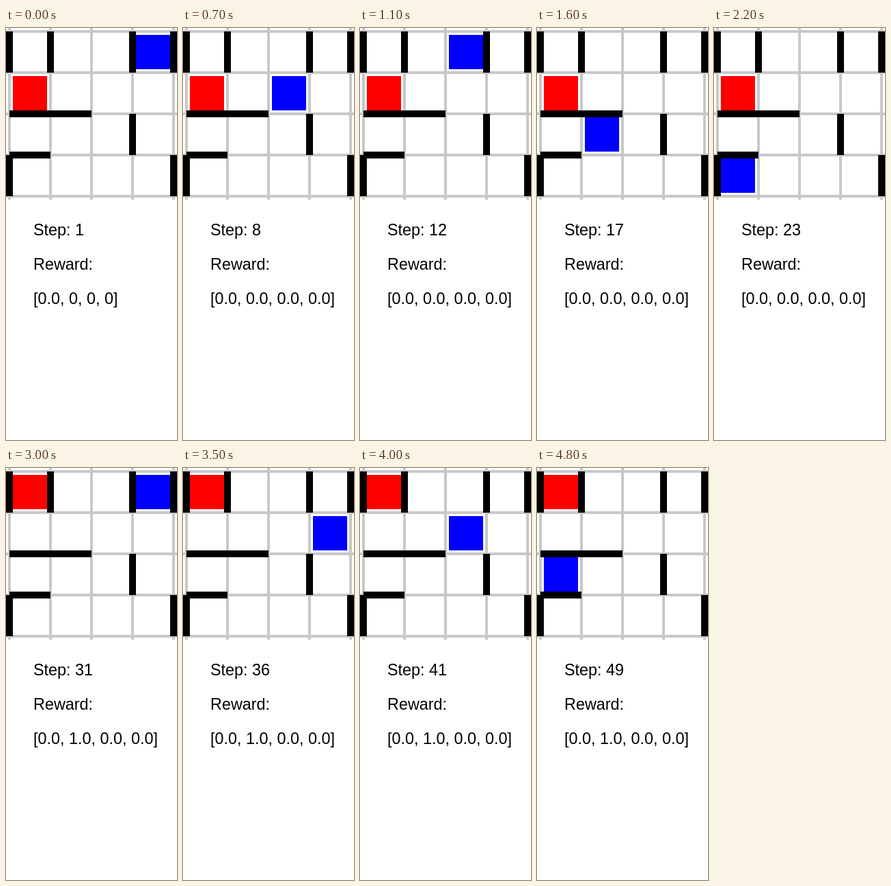
These frames come from a looping animation (250 px wide and 600 px high, 4900 ms). An HTML page with a canvas:

```html
<!DOCTYPE html>
<html lang="en">
<head>
<meta charset="utf-8">
<title>Grid world</title>
<style>
html, body { margin: 0; width: 250px; height: 600px; overflow: hidden; background: #fff; }
canvas { display: block; }
</style>
</head>
<body>
<canvas id="stage" width="250" height="600"></canvas>
<script>
const ctx = document.getElementById('stage').getContext('2d');
const SIZE = 4, CELL = 60, EDGE = 5, STEP_MS = 100, STEPS = 49, GOAL_STEP = 26;

// Walls of each row: its vertical edges, and the floor below its cells
const sides = ['|| ||', '', '   |', '|   |'];
const floors = ['', '==', '=', ''];

// Waypoints on the endless plane, wrapped onto the grid when drawn
const waypoints = [
  { step: 1, x: 3, y: 0 },
  { step: 8, x: 2, y: 1 },
  { step: 13, x: 1, y: 0 },
  { step: 17, x: 1, y: -2 },
  { step: 23, x: 0, y: -1 },
  { step: GOAL_STEP, x: 0, y: 1 },
  { step: GOAL_STEP + 1, x: -1, y: 0 },
  { step: 37, x: 0, y: 1 },
  { step: 41, x: -2, y: 1 },
  { step: 43, x: -3, y: 2 },
  { step: 46, x: -4, y: 2 },
  { step: STEPS, x: -4, y: 2 }
];

const at = n => EDGE + n * CELL;
const wrap = n => (n + 2 * SIZE) % SIZE;

// Walks cell by cell between waypoints, vertically first
function agentAt(step) {
  const next = Math.max(1, waypoints.findIndex(p => p.step >= step));
  const from = waypoints[next - 1], to = waypoints[next];
  const dx = to.x - from.x, dy = to.y - from.y;
  const length = Math.abs(dx) + Math.abs(dy);
  const walked = Math.floor(length * (step - from.step) / (to.step - from.step));
  const down = Math.min(walked, Math.abs(dy));
  return [
    wrap(from.x + Math.sign(dx) * (walked - down)),
    wrap(from.y + Math.sign(dy) * down)
  ];
}

function bar(x1, y1, x2, y2, width, color) {
  ctx.lineWidth = width;
  ctx.strokeStyle = color;
  ctx.beginPath();
  ctx.moveTo(x1, y1);
  ctx.lineTo(x2, y2);
  ctx.stroke();
}

function drawGrid() {
  for (let i = 0; i <= SIZE; i++) {
    bar(at(i), 0, at(i), 250, 4, '#c8c8c8');
    bar(0, at(i), 250, at(i), 4, '#c8c8c8');
  }
  for (let row = 0; row < SIZE; row++) {
    for (let col = 0; col <= SIZE; col++) {
      if (sides[row][col] === '|') bar(at(col), at(row), at(col), at(row + 1), 10, '#000');
      if (floors[row][col] === '=') bar(at(col), at(row + 1), at(col + 1), at(row + 1), 10, '#000');
    }
  }
}

function square(col, row, color) {
  ctx.fillStyle = color;
  ctx.fillRect(at(col) + 5, at(row) + 5, 50, 50);
}

function rewards(step) {
  return Array.from({ length: 4 }, (_, i) => {
    if (i >= step) return '0';
    return i === 1 && step >= GOAL_STEP ? '1.0' : '0.0';
  }).join(', ');
}

function draw(step) {
  ctx.fillStyle = '#fff';
  ctx.fillRect(0, 0, 250, 600);
  drawGrid();
  square(0, step < GOAL_STEP ? 1 : 0, '#f00');
  square(...agentAt(step), '#00f');

  ctx.fillStyle = '#000';
  ctx.font = '23.4px "Liberation Sans", Arial, sans-serif';
  [`Step: ${step}`, 'Reward:', `[${rewards(step)}]`]
    .forEach((text, i) => ctx.fillText(text, 40, 302 + 50 * i));
}

function tick() {
  draw(Math.floor(performance.now() / STEP_MS) % STEPS + 1);
  requestAnimationFrame(tick);
}
tick();
</script>
</body>
</html>
```
